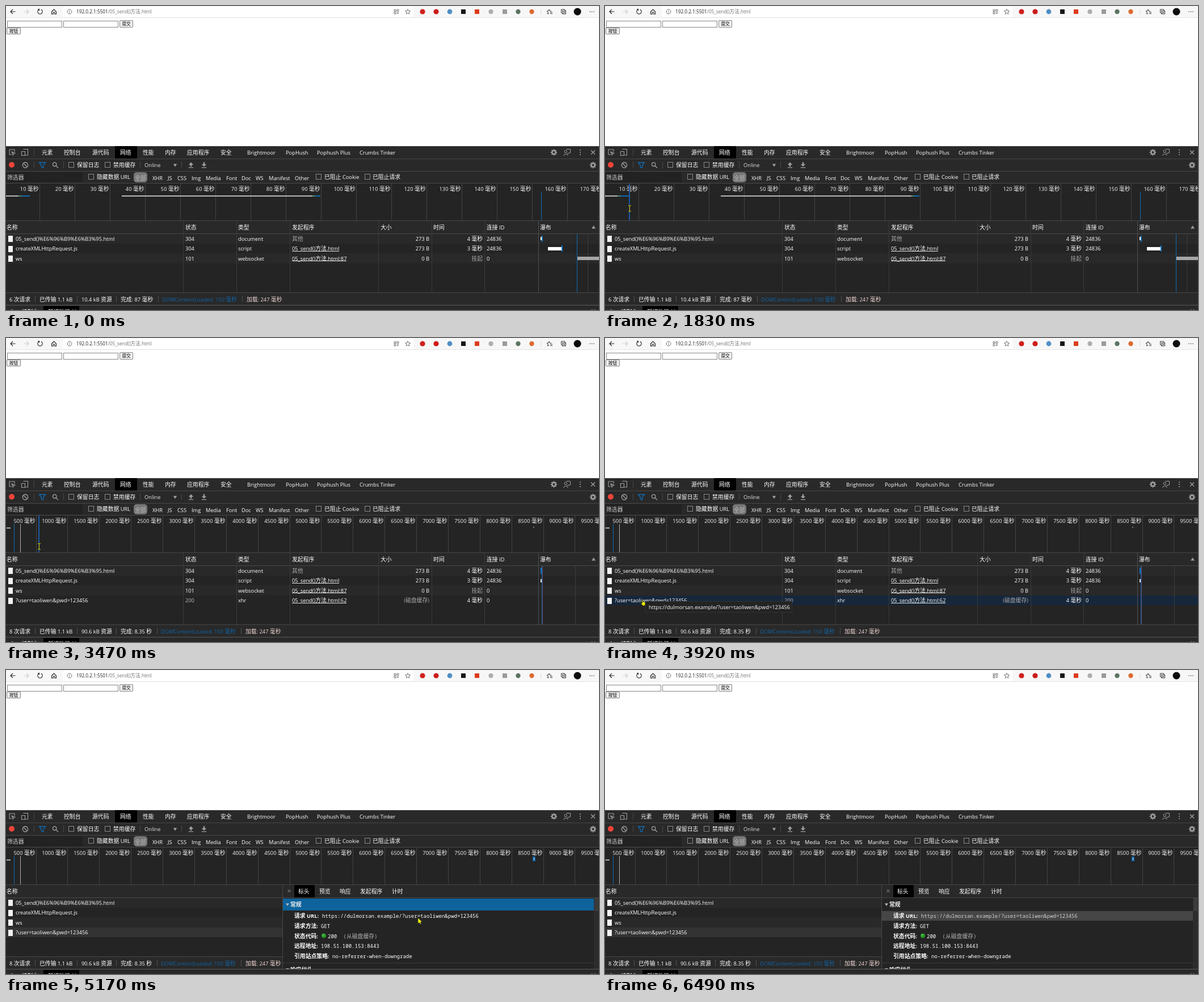
These frames come from a looping animation (1045 px wide and 536 px high, 6570 ms). An HTML page with a canvas:

```html
<!DOCTYPE html>
<html lang="zh-CN">
<head>
<meta charset="utf-8">
<title>Network panel</title>
<style>
html, body { margin: 0; width: 100%; height: 100%; overflow: hidden; background: #fff; }
canvas { display: block; }
</style>
</head>
<body>
<canvas id="stage" width="1045" height="536"></canvas>
<script>
const g = document.getElementById('stage').getContext('2d');
const LOOP = 6570, FIRST = 130, STEP = 77.56;
const BAR = '#292929', BODY = '#242424', EDGE = '#474747', ICON = '#a0a0a0', BLUE = '#0e639c', DIM = '#a8a8a8';
const QUERY = '?user=taoliwen&pwd=123456';
const URL_TEXT = 'https://dulmorsan.example/' + QUERY;

// Pointer path: step, x, y
const PATH = [
  [0, 948, 496], [2, 560, 260], [4, 180, 100], [7, 12, 40], [9, 16, 44], [10, 18, 45], [14, 18, 45],
  [15, 20, 60], [17, 28, 150], [19, 36, 250], [20, 40, 310], [21, 43, 340], [22, 43, 357], [23, 35, 248],
  [24, 46, 180], [26, 88, 30], [27, 86, 9], [28, 50, 24], [29, 21, 46], [36, 21, 46],
  [37, 23, 49], [39, 32, 140], [42, 50, 310], [44, 66, 425], [45, 68, 452], [46, 65, 463], [52, 65, 463],
  [53, 86, 464], [54, 115, 456], [55, 150, 452], [59, 400, 464], [63, 660, 481],
  [64, 698, 461], [65, 726, 437], [67, 742, 433], [69, 770, 435], [71, 802, 452], [72, 826, 470], [73, 932, 518]
];

function box(x, y, w, h, color) {
  g.fillStyle = color;
  g.fillRect(x, y, w, h);
}
function round(x, y, w, h, r, color) {
  g.fillStyle = color;
  g.beginPath();
  g.roundRect(x, y, w, h, r);
  g.fill();
}
function frame(x, y, w, h, color) {
  g.strokeStyle = color;
  g.lineWidth = 1;
  g.strokeRect(x + .5, y + .5, w - 1, h - 1);
}
function dot(x, y, r, color) {
  g.fillStyle = color;
  g.beginPath();
  g.arc(x, y, r, 0, 7);
  g.fill();
}
// Path around (x, y); filled when given a fill colour
function icon(d, x, y, color, width = 1.1, fill) {
  const p = new Path2D(d);
  g.save();
  g.translate(x, y);
  if (fill) { g.fillStyle = fill; g.fill(p); }
  if (color) { g.strokeStyle = color; g.lineWidth = width; g.stroke(p); }
  g.restore();
}
// Latin and CJK runs use separate fonts; y is the middle of the line
function text(s, x, y, color = '#fff', { size = 9.84, bold, mono, right } = {}) {
  const weight = bold ? 'bold ' : '';
  const latin = mono ? `${size * .917}px "Noto Sans Mono", monospace` : `${size * .945}px "Open Sans", sans-serif`;
  const runs = s.match(/[\u2e80-\uffff]+|[^\u2e80-\uffff]+/g).map(run => {
    const font = weight + (run > '\u2e80' ? `${size}px "Noto Sans CJK SC", sans-serif` : latin);
    g.font = font;
    return { run, font, w: g.measureText(run).width };
  });
  if (right) x -= runs.reduce((sum, r) => sum + r.w, 0);
  const start = x;
  g.fillStyle = color;
  for (const r of runs) {
    g.font = r.font;
    g.fillText(r.run, x, y + size * .36);
    x += r.w;
  }
  return x - start;
}
function link(s, x, y) {
  const w = text(s, x, y);
  box(x, Math.round(y + 4), Math.round(w), 1, '#ddd');
}
function check(x, y, label, lx) {
  frame(x, y, 10, 10, '#8a8a8a');
  text(label, lx, y + 5.5);
}
function gear(x, y) {
  for (let i = 0; i < 8; i++) {
    const a = i * Math.PI / 4, c = Math.cos(a), s = Math.sin(a);
    icon(`M${c * 3.5} ${s * 3.5}L${c * 5.6} ${s * 5.6}`, x, y, ICON, 2);
  }
  icon(ring(3), x, y, ICON, 2.2);
}
const ring = r => `M${r} 0A${r} ${r} 0 1 1 ${r} -.01Z`;
const STAR = 'M0 -4.5L1.3 -1.4L4.6 -1.2L2 .9L2.9 4.2L0 2.4L-2.9 4.2L-2 .9L-4.6 -1.2L-1.3 -1.4Z';

function browser(p) {
  box(0, 0, 1045, 247, '#fff');
  box(0, 0, 1045, 20, '#f7f7f7');
  round(100, 1, 618, 18, 3, '#fff');
  box(0, 20, 1045, 1, '#e6e6e6');
  icon('M4.5 0H-4M0 -4L-4 0L0 4', 12, 10, '#222');
  icon('M-4.5 0H4M0 -4L4 0L0 4', 36, 10, '#ccc');
  icon('M2 -3.7A4.2 4.2 0 1 1 -2 -3.7M-3.5 -4.4H-1.5V-1.8', 60, 10, '#222');
  icon('M-4 0L0 -4L4 0V4.2H1.3V1H-1.3V4.2H-4Z', 84.5, 10, '#222');
  icon(ring(4) + 'M0 -.8V2.3M0 -2.3V-1.4', 112, 10, '#666', .9);
  const w = text('192.0.2.1:5501', 124, 10, '#222', { size: 8.7 });
  text('/05_send()方法.html', 124 + w, 10, '#707070', { size: 8.7 });
  icon('M-4 -3.5H-1V-.5H-4ZM1 -3.5H4V-.5H1ZM-4 1H-1V4H-4ZM2.5 .8V4.2M.8 2.5H4.2', 688, 10, '#666', .9);
  icon(STAR, 708, 10, '#666', .9);
  dot(734, 10, 4.6, '#d0211c');
  dot(758, 10, 4.6, '#cf1b1b');
  dot(782, 10, 4.4, '#4f8ec4');
  box(802, 6, 8, 8, '#151515');
  box(826, 6, 8, 8, '#dc3c1e');
  dot(854.5, 10, 4.2, '#aeaeae');
  box(875, 6, 8, 8, '#9a9a9a');
  dot(902.5, 10, 4.2, '#5b7562');
  dot(926.5, 10, 4.2, '#dc6a30');
  box(942, 5, 1, 10, '#ddd');
  icon('M-1 -4L.2 -1.2L3 -1M-1 -4L-2.2 -1.2L-5 -1L-2.8 1L-3.5 4L-1 2.6M1 1H5M1 3.4H5', 958, 10, '#222', .9);
  icon('M-4 -4H2V2H-4ZM-2 2V4H4V-2H2M-1 -2.6V.6M-2.6 -1H.6', 982.5, 10, '#222', .9);
  dot(1007, 10, 6.5, '#0c0c0c');
  for (const x of [1029, 1032.5, 1036]) dot(x, 10, .8, '#333');

  for (const x of [2, 101]) {
    const over = p && p.x > x && p.x < x + 97 && p.y > 25 && p.y < 38;
    frame(x, 26, 97, 12, over ? '#333' : '#858585');
  }
  const hover = p && p.x < 26 && p.y >= 38 && p.y < 51;
  button(200, 25, 24, 13, '提交', false);
  button(1, 38, 25, 12, '按钮', hover, p && p.down);
}
function button(x, y, w, h, label, hover, down) {
  round(x, y, w, h, 2, hover ? '#444' : '#858585');
  round(x + 1, y + 1, w - 2, h - 2, 1, down ? '#f5f5f5' : hover ? '#dedede' : '#efefef');
  text(label, x + w / 2 - 7.6, y + h / 2, '#000', { size: 7.6 });
}

function toolbars() {
  box(0, 247, 1045, 289, BODY);
  box(0, 247, 1045, 65, BAR);
  box(0, 247, 1045, 1, EDGE);
  box(192, 247, 39, 22, '#000');
  icon('M4 -1V-5H-5V4H-1M-1 -1L5 1.5L2.3 2.5L1.3 5Z', 11, 258, ICON);
  icon('M-3 -5.5H5V5H1M-6 -1.5H0V5.5H-6Z', 33.5, 258, ICON);
  box(49, 252, 1, 12, EDGE);
  const tabs = { 元素: 63, 控制台: 102, 源代码: 152, 网络: 201, 性能: 241, 内存: 280, 应用程序: 319, 安全: 378,
    Brightmoor: 425, PopHush: 493, 'Pophush Plus': 548, 'Crumbs Tinker': 623 };
  for (const name in tabs) text(name, tabs[name], 258.5);
  gear(965.5, 258);
  icon('M-1 -5.5H6V1H3.5L1.5 3V1M0 -1.5A2.2 2.2 0 1 1 -4.4 -1.5A2.2 2.2 0 1 1 0 -1.5M-6 6A4 4 0 0 1 1.8 6', 988.5, 258, ICON, 1);
  for (const y of [254, 258, 262]) dot(1012, y, 1, ICON);
  icon('M-3.5 -3.5L3.5 3.5M3.5 -3.5L-3.5 3.5', 1034.5, 258, ICON, 1.3);
  box(0, 269, 1045, 1, EDGE);

  dot(10, 280, 5, '#f04438');
  icon(ring(4.7) + 'M-3.3 -3.3L3.3 3.3', 34, 280.5, ICON, 1.3);
  icon('M-5.5 -4.5H5.5L1.7 .3V5L-1.7 3.5V.3Z', 64, 280.5, '#0f6cb5', 1.3);
  icon('M2 -1.2A3.3 3.3 0 1 1 2 -1.25ZM1 1.2L5 5', 87, 280.5, ICON, 1.3);
  for (const x of [49, 101, 236, 309]) box(x, 274, 1, 12, EDGE);
  check(110, 275, '保留日志', 125);
  check(174, 275, '禁用缓存', 189);
  text('Online', 244, 280.5, '#e0e0e0');
  icon('M-3.2 -2H3.2L0 3Z', 298, 280.5, null, 0, ICON);
  icon('M0 -5L4.2 -.5H1.3V2.5H-1.3V-.5H-4.2ZM-4.2 3.8H4.2V5H-4.2Z', 326, 280.5, null, 0, ICON);
  icon('M0 2.5L4.2 -1.5H1.3V-5H-1.3V-1.5H-4.2ZM-4.2 3.8H4.2V5H-4.2Z', 349, 280.5, null, 0, ICON);
  gear(1034.5, 280.5);
  box(0, 291, 1045, 1, EDGE);

  box(0, 293, 135, 18, '#222');
  text('筛选器', 2, 302, '#c8c8c8');
  check(145, 296, '隐藏数据 URL', 160);
  round(225, 293, 24, 18, 5, '#777');
  text('全部', 227, 303, '#b8b8b8');
  const types = { XHR: 258, JS: 285, CSS: 302, Img: 327, Media: 352, Font: 388, Doc: 415, WS: 440, Manifest: 463, Other: 509 };
  for (const name in types) text(name, types[name], 303);
  check(546, 296, '已阻止 Cookie', 561);
  check(632, 296, '已阻止请求', 646);
}

function overview(sent, open, p) {
  box(0, 312, 1045, 1, EDGE);
  const first = sent ? 53 : 59, gap = sent ? 55.88 : 62, unit = sent ? 500 : 10;
  for (let i = 0; i < 19; i++) {
    const x = Math.floor(first + i * gap);
    box(x, 313, 1, 65, '#434343');
    text(`${unit * (i + 1)} 毫秒`, x - 1.5, 322.5, '#f4f4f4', { right: true });
  }
  if (sent) {
    box(1, 334, 7, 2, '#a9b3ad');
    box(14, 328, 1, 50, '#0f6cb5');
    box(25, 328, 1, 50, '#b8a8a8');
    if (open) {
      box(928, 329, 5, 8, '#1168a8');
      box(930, 331, 1, 4, '#d5e4ee');
    } else box(929, 333, 2, 1, '#b9c4c9');
  } else {
    for (const [x, a, b, end] of [[0, 22, 28, 42], [204, 540, 545, 554]]) {
      box(x, 334, a - x, 2, '#b9b9b9');
      box(a, 334, b - a, 2, '#4b8877');
      box(b, 334, end - b, 2, '#0f6cb5');
    }
    box(943, 328, 1, 50, '#0f6cb5');
  }
  if (p && p.y >= 313 && p.y < 378) box(Math.round(p.x) - 1, 313, 2, 65, '#1c5aa6');
}

const rowTop = i => 401 + Math.round(i * 17.6);

function table(sent, open, p) {
  box(0, 378, 1045, 23, BAR);
  for (const i of [0, 2]) box(0, rowTop(i), 1045, 18, '#292929');
  const hover = p && !open ? Math.floor((p.y - 401) / 17.6) : -1;
  if (hover >= 0 && hover < (sent ? 4 : 3)) box(0, rowTop(hover), 1045, 17, '#16273b');
  if (open) box(0, rowTop(3), 487, 17, '#333');
  box(0, 378, 1045, 1, EDGE);
  box(0, 401, 1045, 1, EDGE);
  text('名称', 1, 390);

  const names = ['05_send()%E6%96%B9%E6%B3%95.html', 'createXMLHttpRequest.js', 'ws', QUERY];
  const cells = [
    ['304', 'document', '', '273 B', '4 毫秒', '24836'],
    ['304', 'script', '05_send()方法.html', '273 B', '3 毫秒', '24836'],
    ['101', 'websocket', '05_send()方法.html:87', '0 B', '挂起', '0'],
    ['200', 'xhr', '05_send()方法.html:62', '(磁盘缓存)', '4 毫秒', '0']
  ];
  for (let i = 0; i < (sent ? 4 : 3); i++) {
    const y = 410.3 + i * 17.5;
    box(4, Math.round(y - 5), 8, 11, '#f2f2f2');
    text(names[i], 17, y);
    if (open) continue;
    const [status, type, from, size, time, id] = cells[i];
    text(status, 316, y, i == 3 ? '#bbb' : '#fff');
    text(type, 409, y);
    if (from) link(from, 504, y);
    else text('其他', 504, y, DIM);
    text(size, 746, y, i == 3 ? DIM : '#fff', { right: true });
    text(time, 840, y, i == 2 ? DIM : '#fff', { right: true });
    text(id, 847, y);
  }
  if (open) return;
  const heads = { 状态: 316, 类型: 409, 发起程序: 504, 大小: 660, 时间: 753, '连接 ID': 847, 瀑布: 941 };
  for (const name in heads) text(name, heads[name], 390);
  icon('M-3.5 2.5H3.5L0 -3Z', 1035.5, 390, null, 0, '#999');
  for (const x of [312, 406, 500, 656, 750, 843]) box(x, 379, 1, 126, '#3a3a3a');
  box(938, 379, 1, 126, '#505050');
  waterfall(sent);
}

function waterfall(sent) {
  box(sent ? 1003 : 1025, 402, 1, 103, '#3c3c3c');
  if (sent) {
    box(942, 405, 2, 11, '#1173c0');
    box(942, 425, 2, 6, '#e8e8e8');
    box(944, 402, 1, 103, '#1160ab');
    box(945, 402, 1, 103, '#6e4458');
    return;
  }
  box(942, 407, 2, 6, '#fff');
  box(944, 405, 2, 11, '#1173c0');
  box(955, 425, 24, 6, '#fff');
  box(979, 422, 2, 11, '#1173c0');
  box(1007, 442, 38, 6, '#a6a6a6');
  box(1006, 402, 1, 103, '#0f6cb5');
}

function status(sent) {
  box(0, 505, 1045, 22, BAR);
  box(0, 505, 1045, 1, EDGE);
  const shift = sent ? -2 : 0;
  for (const x of [51, 125, 194, 268 + shift, 416 + shift]) box(x, 511, 1, 11, '#505050');
  text(sent ? '8 次请求' : '6 次请求', 6, 517);
  text('已传输 1.1 kB', 59, 517);
  text(sent ? '90.6 kB 资源' : '10.4 kB 资源', 133, 517);
  text(sent ? '完成: 8.35 秒' : '完成: 87 毫秒', 202, 517);
  text('DOMContentLoaded: 150 毫秒', 275 + shift, 517, '#1064a8');
  text('加载: 247 毫秒', 424 + shift, 517, '#f3d9d6');
}

function details(picked, focused) {
  box(487, 379, 558, 148, BODY);
  box(488, 379, 557, 22, BAR);
  box(487, 378, 1, 149, EDGE);
  box(488, 401, 557, 1, EDGE);
  icon('M-2.5 -2.5L2.5 2.5M2.5 -2.5L-2.5 2.5', 499, 389.5, '#999', 1);
  box(508, 379, 36, 22, '#000');
  const tabs = { 标头: 515, 预览: 552, 响应: 588, 发起程序: 624, 计时: 680 };
  for (const name in tabs) text(name, tabs[name], 390);
  box(1036, 402, 9, 125, '#2c2c2c');
  box(1037, 402, 7, 23, '#3c3c3c');

  if (!picked) box(488, 403, 548, 21, BLUE);
  else box(488, 425, 548, 17, focused ? BLUE : '#464646');
  const bold = { bold: true }, mono = { mono: true };
  const arrow = y => icon('M-3 -2H3L0 2.5Z', 496, y, null, 0, '#b8b8b8');
  arrow(413.5);
  text('常规', 501, 413.5, '#eee', bold);
  const fields = [['请求 URL:', URL_TEXT, 557], ['请求方法:', 'GET', 555], ['状态代码:', '200', 567],
    ['远程地址:', '198.51.100.153:8443', 555], ['引用站点策略:', 'no-referrer-when-downgrade', 575]];
  fields.forEach(([label, value, x], i) => {
    const y = 433.5 + i * 17.75;
    text(label, 508, y, '#fff', bold);
    text(value, x, y, i == 0 && picked && !focused ? '#d0d0d0' : '#fff', mono);
  });
  dot(560, 468.5, 4, '#2a9a2a');
  dot(559, 467, 1.5, '#58c458');
  text('(从磁盘缓存)', 594.5, 469, '#b5b5b5', mono);
  box(488, 516, 548, 1, '#3a3a3a');
  arrow(528);
  text('响应标头', 501, 528, '#fff', bold);
}

function drawer() {
  box(0, 527, 1045, 9, BAR);
  box(0, 527, 1045, 1, '#5a5a5a');
  dot(11, 535.5, 1, ICON);
  box(66, 529, 63, 7, '#000');
  text('控制台', 28, 539);
  text('新增功能', 74, 539);
  icon('M-3 -3L3 3M3 -3L-3 3', 120, 538, ICON);
  icon('M-3 -3L3 3M3 -3L-3 3', 1035, 538, ICON);
}

function pointer(p, hand) {
  if (p.y >= 313 && p.y < 378) {
    icon('M-2.5 -5H2.5M0 -5V5M-2.5 5H2.5', p.x + .5, p.y, '#222', 2);
    icon('M-2.5 -5H2.5M0 -5V5M-2.5 5H2.5', p.x + .5, p.y, '#d8c800', 1);
  } else if (hand) {
    icon('M0 0L1.5 0L2.2 3.3L6 4.2L5.6 8.5L4.5 10H1.8L-1.6 6L-.8 5L.7 5.8Z', p.x, p.y - 1, '#222', .7, '#ff0');
  } else {
    icon('M0 0V10L2.2 8L3.8 11L5.6 10.2L4.2 7.2L7.2 7Z', p.x, p.y, '#333', .7, '#ff0');
  }
}

function pointerAt(k) {
  if (k < 0 || k > 73) return null;
  const i = Math.max(1, PATH.findIndex(q => q[0] >= k));
  const [a, b] = [PATH[i - 1], PATH[i]];
  const f = (k - a[0]) / (b[0] - a[0]);
  return { x: a[1] + (b[1] - a[1]) * f, y: a[2] + (b[2] - a[2]) * f, down: k == 31 };
}

function draw(k) {
  const p = pointerAt(k), sent = k >= 32, open = k >= 51;
  browser(p);
  toolbars();
  overview(sent, open, p);
  table(sent, open, p);
  status(sent);
  if (open) details(k >= 67, k < 82);
  drawer();
  if (k >= 48 && k < 51) {
    box(71, 464, 259, 20, '#333');
    box(72, 465, 257, 18, '#232323');
    text(URL_TEXT, 77, 474.5);
  }
  if (p) pointer(p, k >= 46 && k <= 53);
}

let shown;
function tick() {
  const t = performance.now() % LOOP;
  const k = Math.max(-1, Math.floor((t - FIRST + 10) / STEP));
  if (k !== shown) draw(shown = k);
  requestAnimationFrame(tick);
}
tick();
</script>
</body>
</html>
```
